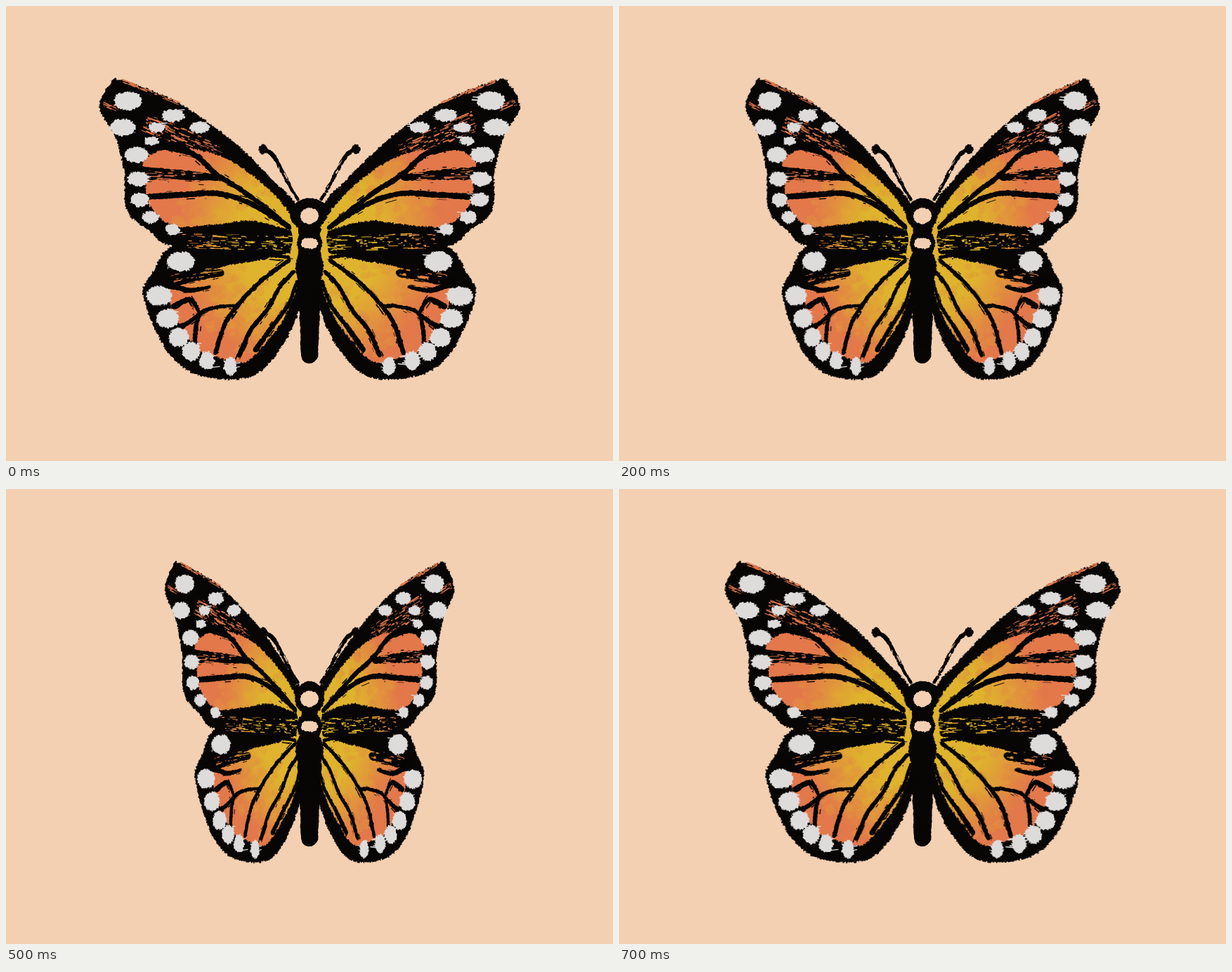
Animation, 864 px wide and 648 px high, one loop 0.8 s. Source, as an HTML page with a canvas:

```html
<!DOCTYPE html>
<html lang="en">
<head>
<meta charset="utf-8">
<title>Butterfly</title>
<style>
html, body { margin: 0; width: 100%; height: 100%; overflow: hidden; background: #f4d0b2; }
canvas { display: block; }
</style>
</head>
<body>
<canvas id="stage" width="864" height="648"></canvas>
<script>
const W = 864, H = 648, MID = 432;
const BG = '#f4d0b2', INK = '#080605', WHITE = '#dedbdb', ORANGE = '#e3784a', YELLOW = '#dfb32d';

let seed = 1;
const rnd = () => {
  seed = (seed + 0x6D2B79F5) | 0;
  let t = Math.imul(seed ^ (seed >>> 15), seed | 1);
  t ^= t + Math.imul(t ^ (t >>> 7), t | 61);
  return ((t ^ (t >>> 14)) >>> 0) / 4294967296;
};
const jit = a => (rnd() * 2 - 1) * a;
const mix = (a, b, t) => a + (b - a) * t;

function layer() {
  const c = document.createElement('canvas');
  c.width = W; c.height = H;
  return c.getContext('2d');
}

const points = text => text.trim().split(/\s+/).map(s => s.split(',').map(Number));

// Smooth curve through key points, sampled about once per pixel
function curve(text, closed) {
  const p = points(text), n = p.length, out = [];
  const at = i => closed ? p[(i + n) % n] : p[Math.max(0, Math.min(n - 1, i))];
  for (let i = 0; i < (closed ? n : n - 1); i++) {
    const [a, b, c, d] = [at(i - 1), at(i), at(i + 1), at(i + 2)];
    const steps = Math.ceil(Math.hypot(c[0] - b[0], c[1] - b[1]));
    for (let s = 0; s < steps; s++) {
      const t = s / steps;
      out.push([0, 1].map(k => b[k] + t / 2 * (c[k] - a[k] +
        t * (2 * a[k] - 5 * b[k] + 4 * c[k] - d[k] + t * (3 * (b[k] - c[k]) + d[k] - a[k])))));
    }
  }
  return out;
}

function fillRough(g, pts, color, amount) {
  g.fillStyle = color;
  g.beginPath();
  for (const [x, y] of pts) g.lineTo(x + jit(amount), y + jit(amount));
  g.fill();
}
const shape = (g, text, color) => fillRough(g, curve(text, true), color, 1.5);

function oval(g, x, y, rx, ry, color, amount = 1) {
  const n = Math.round((rx + ry) * 3);
  const pts = Array.from({ length: n }, (_, i) => {
    const a = i / n * Math.PI * 2;
    return [x + rx * Math.cos(a), y + ry * Math.sin(a)];
  });
  fillRough(g, pts, color, amount);
}

// Tapered brush line, from radius r0 to r1
function brush(g, text, r0, r1, color, skip = 0) {
  const pts = curve(text);
  pts.forEach(([x, y], i) => {
    const r = mix(r0, r1, i / pts.length) * (.8 + rnd() * .4);
    if (rnd() >= skip) oval(g, x + jit(.5), y + jit(.5), r, r, color, .3);
  });
}

// Dry brush: short parallel flecks around a line
function dry(g, x0, y0, x1, y1, spread, count, color) {
  const a = Math.atan2(y1 - y0, x1 - x0), c = Math.cos(a), s = Math.sin(a);
  g.strokeStyle = color;
  for (let i = 0; i < count; i++) {
    const t = rnd(), o = jit(spread), len = 1 + rnd() * rnd() * 18;
    const x = mix(x0, x1, t) - s * o, y = mix(y0, y1, t) + c * o;
    g.lineWidth = .5 + rnd() * 1.3;
    g.beginPath();
    g.moveTo(x, y);
    g.lineTo(x + c * len, y + s * len);
    g.stroke();
  }
}

// A vein is a brush line with loose bristles beside it
function vein(g, text, r0, r1) {
  brush(g, text, r0, r1, INK);
  const p = points(text);
  for (let i = 1; i < p.length; i++) dry(g, ...p[i - 1], ...p[i], r0 + 3, 9, INK);
}

// White spots through key points, shrinking along the row
function spots(g, text, rx0, rx1, ry0, ry1) {
  points(text).forEach(([x, y], i, all) => {
    const t = i / (all.length - 1), rx = mix(rx0, rx1, t), ry = mix(ry0, ry1, t);
    oval(g, x, y, rx, ry, WHITE, 1.6);
    dry(g, x - rx, y + 1, x + rx * .7, y - 1, ry * .8, 14, WHITE);
  });
}

// Yellow near the body, blotching into orange further out
function paint() {
  const g = layer(), fade = g.createRadialGradient(428, 332, 100, 428, 332, 185);
  fade.addColorStop(0, YELLOW);
  fade.addColorStop(1, ORANGE);
  g.fillStyle = fade;
  g.fillRect(0, 0, W, H);
  g.globalAlpha = .2;
  for (let i = 0; i < 300; i++) {
    const a = Math.PI * mix(.4, 1.5, rnd()), d = mix(80, 190, rnd()), r = mix(2, 10, rnd());
    oval(g, 428 + Math.cos(a) * d, 332 + Math.sin(a) * d, r, r * .8, rnd() < .5 ? YELLOW : ORANGE, 2);
  }
  return g.canvas;
}

function wing(start) {
  seed = start;
  const g = layer(), tint = g.createPattern(paint(), 'repeat');

  // Dark silhouettes with a coloured field inside each
  shape(g, `163,105 245,138 320,190 380,248 414,286 424,345 330,352 236,342 203,319 172,291
    168,235 155,185 134,150 136,130 147,113`, INK);
  shape(g, `240,340 207,382 195,410 212,460 236,500 272,525 335,531 375,508 414,442 428,350 330,338`, INK);
  oval(g, MID, 297, 28, 23, INK);
  shape(g, '198,218 240,202 300,212 345,237 385,272 408,302 412,320 350,306 300,311 240,313 205,285 199,250', tint);
  shape(g, '412,354 360,362 310,371 240,392 234,425 250,458 272,488 300,500 340,507 372,477 398,440 416,390', tint);
  brush(g, '407,312 413,330 409,358', 4, 5, tint);

  // Streaks of colour along the front edge, tip and middle band
  dry(g, 165, 106, 240, 136, 2, 50, ORANGE);
  dry(g, 138, 137, 158, 146, 5, 18, ORANGE);
  dry(g, 195, 163, 300, 208, 14, 150, ORANGE);
  dry(g, 250, 334, 405, 338, 11, 120, tint);

  // Upper veins
  vein(g, '404,316 370,288 335,262 300,240 270,213 235,196', 3, 3.5);
  vein(g, '180,238 240,240 298,244', 9, 4);
  dry(g, 190, 240, 280, 242, 9, 40, ORANGE);
  vein(g, '180,273 250,269 300,267 345,280 402,314', 4, 3);
  vein(g, '195,196 235,203 275,214', 4, 2);
  oval(g, 347, 317, 38, 9, INK);

  // Lower veins
  vein(g, '320,354 365,354 403,358', 3, 2);
  vein(g, '403,362 365,390 335,420 312,452 298,495', 2.5, 3);
  vein(g, '330,427 300,429 275,441 268,488', 2, 3);
  vein(g, '410,378 390,400 372,432 348,462 332,498', 2.5, 3);
  vein(g, '414,392 402,425 380,455 355,490', 2, 3.5);
  vein(g, '305,380 270,385 225,395', 5, 7);
  vein(g, '290,400 262,405 235,398', 2, 4);
  vein(g, '276,438 262,418 240,428', 2, 4);
  vein(g, '276,438 258,452 240,460', 2, 4);
  dry(g, 235, 388, 300, 378, 7, 20, tint);

  spots(g, '174,135 166,173 186,212 188,246 190,276 206,301 237,318', 20, 10, 13, 8);
  spots(g, '238,156 276,173 215,173 207,192', 16, 10, 9, 6);
  spots(g, '249,364 218,413 230,445 246,472 264,492 286,505 319,513', 20, 9, 14, 13);
  return g.canvas;
}

function body() {
  seed = 77;
  const g = layer();
  for (const side of [1, -1]) {
    g.setTransform(side, 0, 0, 1, side > 0 ? 0 : W, 0);
    brush(g, '416,276 405,258 386,222 376,209 366,204', 2, 3, INK, side > 0 ? .1 : .3);
    oval(g, 366, 204, 6, 7, INK);
    dry(g, 413, 268, 388, 222, 4, 8, BG);
  }
  g.setTransform(1, 0, 0, 1, 0, 0);
  brush(g, '412,279 432,272 452,279', .6, .6, BG, .3);
  oval(g, MID, 298, 21, 23, INK);
  oval(g, MID, 338, 18, 20, INK);
  oval(g, MID, 372, 20, 28, INK);
  brush(g, '432,390 432,498', 15, 10, INK);
  oval(g, MID, 299, 13, 11.5, BG);
  oval(g, MID, 338, 12, 8, BG);
  return g.canvas;
}

const left = wing(11), right = wing(42), torso = body();
const ctx = document.getElementById('stage').getContext('2d');
const SPREAD = [1, .94, .842, .688, .5];

function place(img, scale) {
  ctx.setTransform(scale, 0, 0, 1, MID * (1 - scale), 0);
  ctx.drawImage(img, 0, 0);
}

function draw(now) {
  const step = Math.floor(now / 100) % 8, k = SPREAD[Math.min(step, 8 - step)];
  ctx.setTransform(1, 0, 0, 1, 0, 0);
  ctx.fillStyle = BG;
  ctx.fillRect(0, 0, W, H);
  place(left, k);
  place(right, -k);
  place(torso, 1);
  requestAnimationFrame(draw);
}
draw(0);
</script>
</body>
</html>
```
